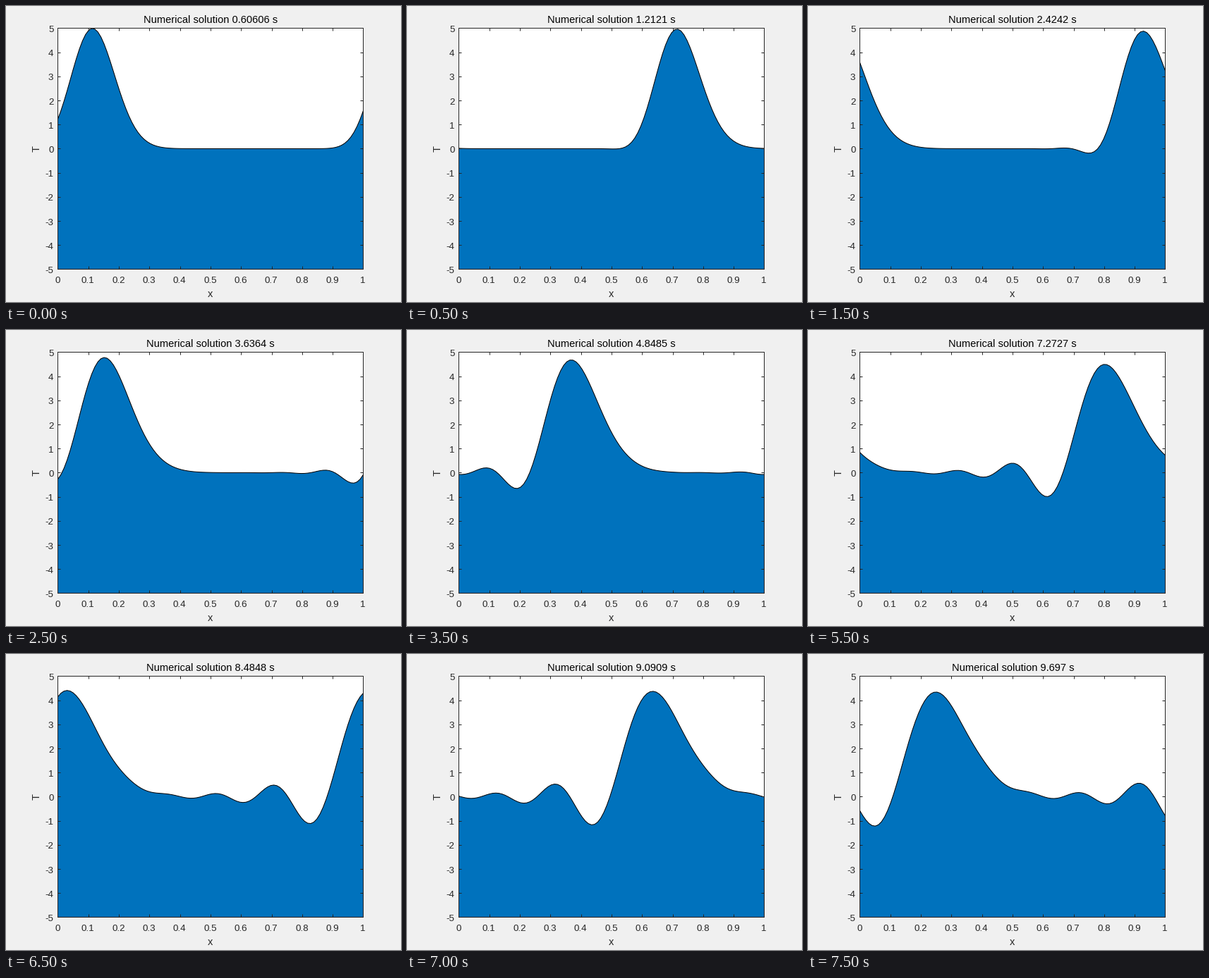
A matplotlib script for the animation above (8000 ms loop, 560 by 420 pixels).

```python
import numpy as np
import matplotlib.pyplot as plt
from matplotlib.animation import FuncAnimation
from matplotlib.patches import Polygon

W, H, DPI = 560, 420, 100
FRAMES, INTERVAL = 16, 500
PX = 72 / DPI  # points per pixel

# Leapfrog advection of a Gaussian on a periodic grid
N = 100
DX = 1 / (N - 1)
CFL = 0.3
DT = CFL * DX
STEPS = 200  # time steps between pictures
x = np.linspace(0, 1, N)


def pulse(centre):
    return 5 * np.exp(-((x[:-2] - centre) / 0.1) ** 2)


def solve():
    old, now = pulse(0.5), pulse(0.5 + DT)
    states = []
    for n in range(1, FRAMES * STEPS + 1):
        slope = np.roll(now, -1) - np.roll(now, 1)
        old, now = now, old - CFL * slope
        if n % STEPS == 0:
            # the last two nodes repeat the first two
            states.append(np.append(now, now[:2]))
    return states


states = solve()

plt.rcParams["font.family"] = "Liberation Sans"
fig = plt.figure(figsize=(W / DPI, H / DPI), dpi=DPI, facecolor="#f0f0f0")

# Axes box in pixels from the top left, just below pixel centres for snapping
LEFT, TOP, WIDTH, HEIGHT = 73.45, 31.45, 433, 342
INK = "#262626"
ax = fig.add_axes([LEFT / W, 1 - (TOP + HEIGHT) / H, WIDTH / W, HEIGHT / H])
ax.set(xlim=(0, 1), ylim=(-5, 5),
       xticks=np.arange(11) / 10, yticks=np.arange(-5, 6))
ax.set_axisbelow(False)
ax.tick_params(direction="in", length=4.3 * PX, width=PX, color=INK,
               top=True, right=True, labelbottom=False, labelleft=False)
for spine in ax.spines.values():
    spine.set(linewidth=PX, edgecolor=INK)


def label(px, py, text, size, ha="center", color=INK, **kw):
    """Text with its baseline at pixel (px, py) from the top left."""
    return fig.text(px / W, 1 - py / H, text, fontsize=size * PX, ha=ha,
                    va="baseline", color=color, **kw)


SMALL, LARGE = 13.33, 14.6
MID_X = LEFT + WIDTH / 2
MID_Y = TOP + HEIGHT / 2
for i in range(11):
    label(LEFT - 0.5 + WIDTH * i / 10, 393, f"{i / 10:g}", SMALL)
    label(67.5, TOP + HEIGHT * i / 10 + 5.6, str(5 - i), SMALL, "right")
label(MID_X, 413, "x", LARGE)
label(48, MID_Y, "T", LARGE, rotation=90, rotation_mode="anchor")
title = label(MID_X + 0.3, 24, "", LARGE, color="black")

area = ax.add_patch(Polygon([(0, 0), (1, 0), (1, 1)], facecolor="#0072bd",
                            edgecolor="black", linewidth=PX))


def draw(k):
    top = np.column_stack([x, states[k]])
    area.set_xy(np.vstack([[0, -5], top, [1, -5]]))
    title.set_text(f"Numerical solution {(k + 1) * STEPS * DT:.5g} s")
    return area, title


anim = FuncAnimation(fig, draw, frames=FRAMES, interval=INTERVAL,
                     repeat=True, repeat_delay=0)
plt.show()
```
